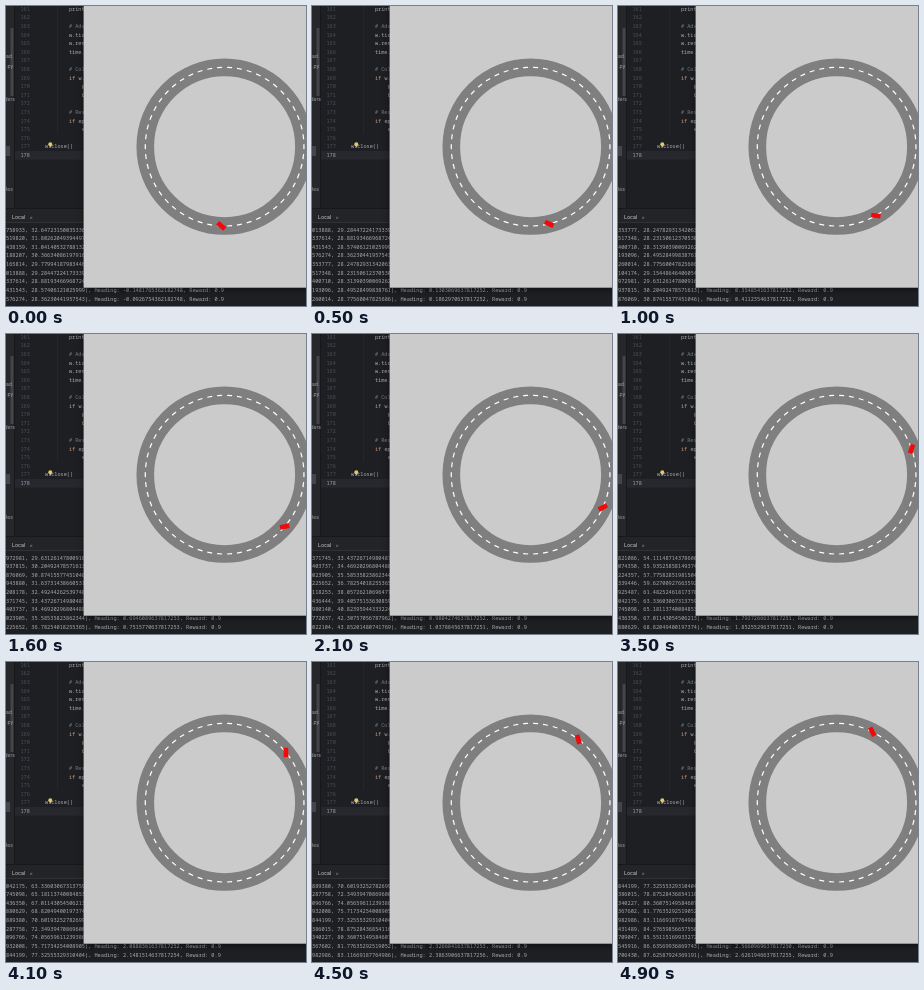
An HTML page with a canvas that plays this animation: 300 by 300 pixels, repeating every 5 s.

```html
<!DOCTYPE html>
<html lang="en">
<head>
<meta charset="utf-8">
<style>
html, body { margin: 0; overflow: hidden; background: #1e1f22; }
canvas { display: block; width: 300px; height: 300px; }
</style>
</head>
<body>
<canvas id="stage" width="300" height="300"></canvas>
<script>
const ctx = document.getElementById('stage').getContext('2d');
const MONO = '"Noto Sans Mono", monospace', SANS = 'Inter, sans-serif';
const ROW = 8.6;
// The simulated world is 120 m wide; its ring road lies between 30 m and 37.5 m.
const PPM = 2.35, CX = 218.6, CY = 140.7, HALF = 60 * PPM, LANE = 33.75 * PPM;
const MARKERS = 50;

const PLAIN = '#a9abb1', COMMENT = '#7a7e85', KEYWORD = '#c79a80';
// [line number, x, text, colour]
const code = [
  [161, 63, 'print(f"', PLAIN],
  [163, 63, '# Advance', COMMENT],
  [164, 63, 'w.tick()', PLAIN],
  [165, 63, 'w.render()', PLAIN],
  [166, 63, 'time.sleep', PLAIN],
  [168, 63, '# Collision', COMMENT],
  [169, 63, 'if', KEYWORD],
  [169, 72.4, 'w.col', PLAIN],
  [170, 76, 'print', PLAIN],
  [171, 76, 'break', KEYWORD],
  [173, 63, '# Reset', COMMENT],
  [174, 63, 'if', KEYWORD],
  [174, 72.4, 'epi', PLAIN],
  [175, 76, 'ep', PLAIN],
  [177, 39, 'w.close()', PLAIN]
];

function rect(x, y, w, h, color) {
  ctx.fillStyle = color;
  ctx.fillRect(x, y, w, h);
}

function text(s, x, y, color, size = 5.2, family = MONO) {
  ctx.font = size + 'px ' + family;
  ctx.fillStyle = color;
  ctx.fillText(s, x, y);
}

const heading = k => -0.0926754362182748 + 0.05555 * k + 0.0000489 * k * k;

function logLine(k) {
  const h = heading(k), noise = Math.abs(Math.sin(k * 12.9898 + 4) * 43758.5453) % 1;
  const tail = String(Math.floor(noise * 1e6)).padStart(6, '0');
  const y = 59.989 - 31.763 * Math.cos(h);
  return `${tail}, ${y.toFixed(14)}), Heading: ${h.toFixed(16)}, Reward: 0.9`;
}

function editor() {
  rect(0, 0, 300, 300, '#1e1f22');
  rect(0, 0, 8, 202, '#25272a');
  rect(0, 140, 4, 10, '#43454a');
  rect(4.5, 22, 3, 68, '#434548');
  rect(8, 0, 1, 202, '#17181a');
  rect(9, 145, 69, 8.6, '#26282e');
  const side = [['ad.', 0, 52], ['t.py', -1.5, 61.5], ['ders', -1.5, 95], ['les', 0, 185]];
  for (const [s, x, y] of side) text(s, x, y, '#a0a3a9', 5, SANS);
  for (let n = 161; n <= 178; n++)
    text(n, 14.5, 4.8 + (n - 161) * ROW, n == 178 ? '#a1a3ab' : '#4b5059');
  rect(51, 0, 0.5, 128, '#2c2e32');
  for (const [n, x, s, color] of code) text(s, x, 4.8 + (n - 161) * ROW, color);
  ctx.fillStyle = '#e8c66a';
  ctx.beginPath();
  ctx.arc(44.3, 138.3, 2, 0, 7);
  ctx.fill();
  rect(43.5, 140, 1.6, 1.4, '#b9bbc0');
}

function terminal(last) {
  rect(0, 202, 300, 1, '#17181a');
  rect(0, 203, 300, 14, '#222427');
  text('Local', 6, 213, '#cfd1d5', 5.2, SANS);
  text('×', 23.5, 213, '#8b8e94', 5.2, SANS);
  rect(0, 216, 300, 1, '#2f3134');
  for (let i = 0; i < 9; i++)
    text(logLine(last - 8 + i), 0, 225.6 + i * 8.63, '#a9abb0', 5.28);
}

function road() {
  ctx.lineWidth = 7.5 * PPM;
  ctx.strokeStyle = '#7f7f7f';
  ctx.beginPath();
  ctx.arc(CX, CY, LANE, 0, Math.PI * 2);
  ctx.stroke();
  const length = Math.PI * LANE / MARKERS;
  for (let i = 0; i < MARKERS; i++) {
    ctx.save();
    ctx.translate(CX, CY);
    ctx.rotate(i * 2 * Math.PI / MARKERS);
    rect(LANE - 0.6, -length / 2, 1.2, length, '#fff');
    ctx.restore();
  }
}

function simulator(step) {
  ctx.save();
  ctx.shadowColor = 'rgba(0,0,0,.6)';
  ctx.shadowBlur = 7;
  ctx.shadowOffsetY = 1;
  rect(CX - HALF, -10, 2 * HALF, CY + HALF + 10, '#cbcbcb');
  ctx.restore();
  road();

  const h = heading(step), a = h + 0.05;
  ctx.save();
  ctx.translate(CX + LANE * Math.sin(a), CY + LANE * Math.cos(a));
  ctx.rotate(0.61 - h);
  rect(-2 * PPM, -PPM, 4 * PPM, 2 * PPM, '#f20a0a');
  ctx.restore();
}

function draw() {
  const tick = Math.floor(performance.now() % 5000 / 100);
  const step = 0.962 * tick + 0.35;
  editor();
  // The log sometimes trails the car by one step.
  terminal(Math.floor(step));
  simulator(Math.round(step));
  requestAnimationFrame(draw);
}
draw();
</script>
</body>
</html>
```
